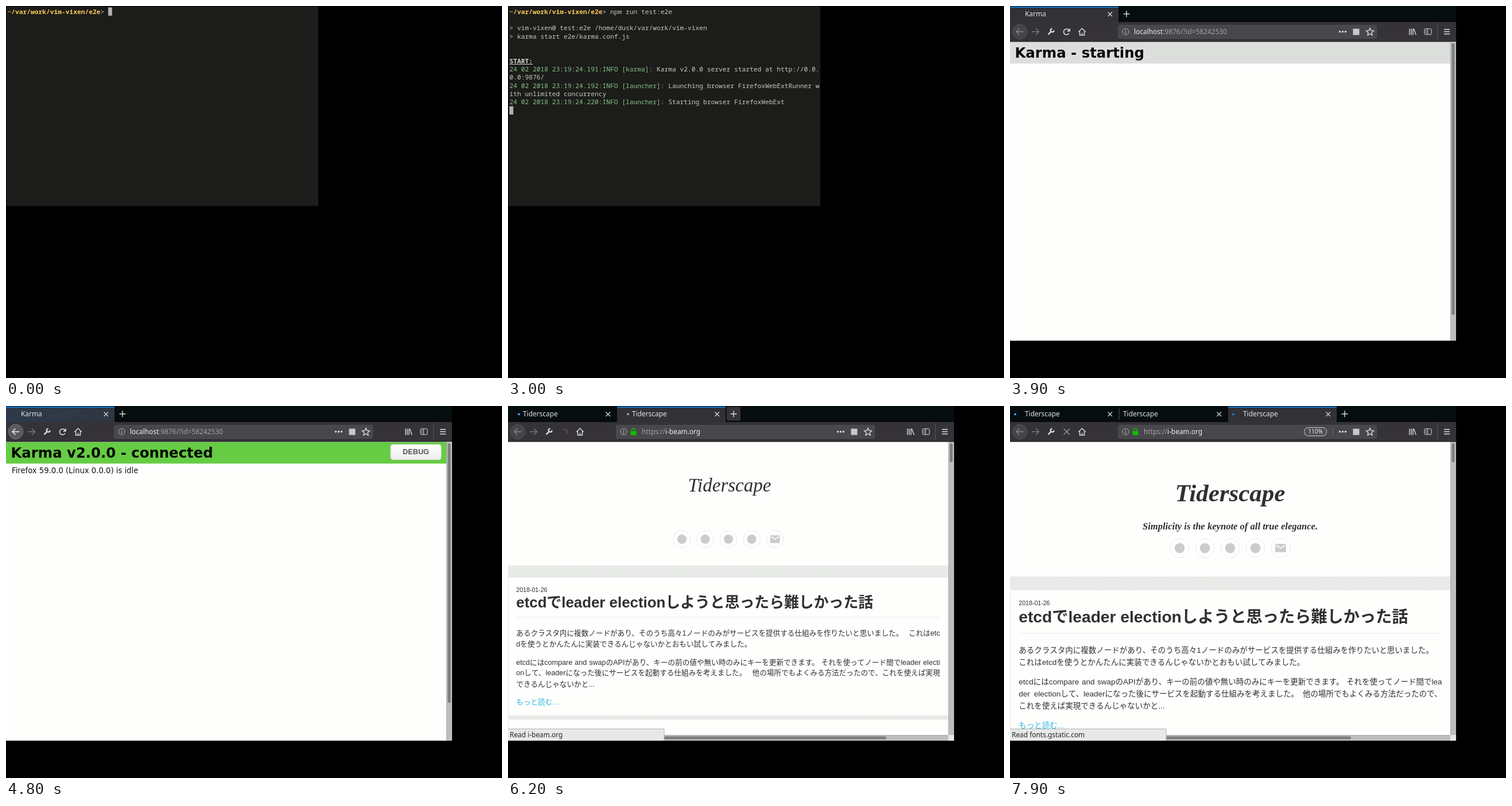
Animation of 864x648 px, one loop 8 s. Source, as an HTML page with a canvas:

```html
<!DOCTYPE html>
<html lang="en">
<head>
<meta charset="utf-8">
<title>End-to-end test run</title>
<style>
html, body { margin: 0; width: 100%; height: 100%; overflow: hidden; background: #000; }
canvas { display: block; }
</style>
</head>
<body>
<canvas id="stage" width="864" height="648"></canvas>
<script>
const g = document.getElementById('stage').getContext('2d');
const UI = '"Noto Sans", sans-serif';
const MONO = '11.25px "Noto Sans Mono", monospace';
const WEB = '"Liberation Sans", "Noto Sans CJK JP", sans-serif';
const SERIF = '"Liberation Serif", serif';
const SITE = 'Tiderscape';
const LIGHT = '#dcdcdd', DIM = '#77767a', PAPER = '#fefefd';

function rect(x, y, w, h, color) {
  g.fillStyle = color;
  g.fillRect(x, y, w, h);
}
function round(x, y, w, h, r, fill, stroke) {
  g.beginPath();
  g.roundRect(x, y, w, h, r);
  if (fill) { g.fillStyle = fill; g.fill(); }
  if (stroke) { g.strokeStyle = stroke; g.lineWidth = 1; g.stroke(); }
}
function circle(x, y, r, fill, stroke, width = 1) {
  g.beginPath();
  g.arc(x, y, r, 0, 7);
  if (fill) { g.fillStyle = fill; g.fill(); }
  if (stroke) { g.strokeStyle = stroke; g.lineWidth = width; g.stroke(); }
}
function line(d, color, width = 1.5) {
  g.strokeStyle = color;
  g.lineWidth = width;
  g.stroke(new Path2D(d));
}
// Draws text and returns the x where it ends.
function text(s, x, y, font, color, align = 'left') {
  g.font = font;
  g.fillStyle = color;
  g.textAlign = align;
  g.fillText(s, x, y);
  return x + g.measureText(s).width;
}

// ---- terminal ----
const CELL = 6.75, ROW = 14.35;
const COMMAND = 'npm run test:e2e';
const OUTPUT = [ // [row, time, text, green length]
  [2, 2700, '> vim-vixen@ test:e2e /home/dusk/var/work/vim-vixen', 0],
  [3, 2700, '> karma start e2e/karma.conf.js', 0],
  [7, 2900, '24 02 2018 23:19:24.191:INFO [karma]: Karma v2.0.0 server started at http://0.0.', 37],
  [8, 2900, '0.0:9876/', 0],
  [9, 2900, '24 02 2018 23:19:24.192:INFO [launcher]: Launching browser FirefoxWebExtRunner w', 40],
  [10, 2900, 'ith unlimited concurrency', 0],
  [11, 3000, '24 02 2018 23:19:24.220:INFO [launcher]: Starting browser FirefoxWebExt', 40]
];

function put(s, col, row, color, bold) {
  text(s, 2.5 + col * CELL, 13.6 + row * ROW, (bold ? 'bold ' : '') + MONO, color);
}
function terminal(t) {
  const fg = '#c8c8c2';
  const typed = Math.max(0, Math.min(COMMAND.length, Math.floor((t - 900) / 100)));
  rect(1, 1, 543, 347.5, '#1c1c1a');
  put('~/var/work/vim-vixen/e2e', 0, 0, '#fccb58', true);
  put('>', 24, 0, '#c5c8d8');
  put(COMMAND.slice(0, typed), 26, 0, fg);
  for (const [row, time, s, green] of OUTPUT) {
    if (t < time) continue;
    put(s.slice(0, green), 0, row, '#87c48a');
    put(s.slice(green), green, row, fg);
  }
  if (t >= 2800) {
    put('START:', 0, 6, '#d4d4d0', true);
    rect(2.5, 101, 6 * CELL, 1, '#d4d4d0');
  }
  const row = t < 2600 ? 0 : t < 2700 ? 1 : t < 2800 ? 5 : t < 2900 ? 7 : t < 3000 ? 11 : 12;
  rect(2.5 + (row ? 0 : 26 + typed) * CELL, 2.5 + row * ROW, CELL, ROW, '#b2b2b0');
}

// ---- browser frame ----
function tab(i, { title, load, glow = 0 }, active, t) {
  const x = i * 190;
  if (active) {
    rect(x, 1, 189, 27, '#323135');
    rect(x, 1, 189, 1.7, '#1683e0');
  } else if (i) rect(x - 0.5, 4, 1, 20, '#55585a');
  if (glow) {
    const fade = g.createLinearGradient(x, 0, x + 170, 0);
    fade.addColorStop(0, `rgba(10,132,255,${glow})`);
    fade.addColorStop(1, `rgba(10,132,255,${glow * 0.6})`);
    rect(x, 3, active ? 189 : 158, 25, fade);
  }
  if (load) {
    const swing = 1.4 * Math.cos((t - 6200) / 1050 * 2 * Math.PI);
    circle(x + 14 + 5 * Math.max(-1, Math.min(1, swing)), 14.3, 1.9, load);
  }
  text(title, x + (i === 0 || load ? 26 : 7), 18.4, '11.9px ' + UI, '#e4e4e6');
  line(`M${x + 170.5} 10.5l7.5 7.5m0-7.5l-7.5 7.5`, '#d0d0d2', 1.4);
}

function reloadIcon(mode) {
  if (mode === 'x') return line('M93.5 39.5l10.5 10.5m0-10.5l-10.5 10.5', '#98979b', 1.4);
  if (mode === 'slash') return line('M93.5 40l9 9', '#67666a', 1.3);
  const arc = mode === 'arc';
  g.beginPath();
  g.arc(98.5, 45, 5, arc ? -2.3 : 0.5, arc ? 0.9 : 5.6);
  g.strokeStyle = arc ? '#646367' : LIGHT;
  g.lineWidth = arc ? 1.2 : 1.7;
  g.stroke();
  if (!arc) {
    g.fillStyle = LIGHT;
    g.fill(new Path2D('M104.8 38.8v5.7h-5.7z'));
  }
}

function starIcon(x, y) {
  g.beginPath();
  for (let i = 0; i < 10; i++) {
    const a = i * Math.PI / 5 - Math.PI / 2, r = i % 2 ? 3.2 : 6.8;
    g.lineTo(x + r * Math.cos(a), y + r * Math.sin(a));
  }
  g.closePath();
  g.strokeStyle = LIGHT;
  g.lineWidth = 1.4;
  g.stroke();
}

function zoomPill(pulse) {
  g.save();
  g.beginPath();
  g.rect(188, 33, 450.5, 24);
  g.clip();
  if (pulse) {
    round(585.5, 34.5, 58, 20.5, 10, '#4e4d51', '#d4d4d6');
    text('110%', 596.5, 49.7, '13.6px ' + UI, '#ececee');
  } else {
    round(512.5, 37.5, 39, 14.5, 7, '#4e4d51', '#d4d4d6');
    text('110%', 532, 48.3, '10px ' + UI, '#ececee', 'center');
  }
  g.restore();
}

function frame(t, o) {
  rect(0, 0, 777, 28, '#060d0f');
  rect(0, 28, 777, 34, '#353338');
  rect(0, 61.5, 777, 1, '#151416');
  o.tabs.forEach((item, i) => tab(i, item, i === o.tabs.length - 1, t));
  const plus = o.tabs.length * 190 + 13;
  if (o.hover) round(plus - 12, 1.5, 24, 24, 2, '#343436');
  line(`M${plus - 5.5} 13.7h11m-5.5-5.5v11`, '#d8d8da', 1.5);

  circle(17, 44.7, 12.8, o.back ? '#59585d' : '#454449', o.back ? '#77767b' : '#504f54');
  line('M23.5 44.7h-12.5m5.5-5.5l-5.5 5.5l5.5 5.5', o.back ? '#efeff0' : '#858488');
  line('M38 44.7h12.5m-5.5-5.5l5.5 5.5l-5.5 5.5', DIM);
  line('M66.5 49.7l5.5-5.5', LIGHT, 2.4);
  g.beginPath();
  g.arc(73.6, 42.4, 2.9, 0, 4.7);
  g.lineWidth = 2.2;
  g.stroke();
  reloadIcon(o.reload);
  line('M119.3 45.2l6.2-6.2l6.2 6.2m-10.2-1v6.5h8v-6.5m-4 6.5v-4', LIGHT);

  round(188.5, 33.5, 450, 23, 2, '#48474b', '#4f4e52');
  if (o.search) {
    circle(200, 43.3, 4.2, null, '#a5a4a8', 1.5);
    line('M203 46.5l5 4.5', '#a5a4a8', 1.8);
  } else {
    circle(201.5, 44.7, 5.4, null, '#b6b5b9', 1);
    line('M201.5 43.7v4m0-6v1.2', '#b6b5b9', 1.3);
    rect(562, 37, o.pill ? 1 : 0, 16, '#66656a');
    for (const x of [574.5, 579.5, 584.5]) circle(x, 44.7, 1.7, LIGHT);
    rect(597.5, 39.5, 11, 11, '#c9c9cb');
    starIcon(627, 45.3);
  }
  if (o.lock) {
    round(213.5, 43.7, 10, 7, 1, '#12bc00');
    line('M215.7 44v-2a2.8 2.8 0 0 1 5.6 0v2', '#12bc00', 1.6);
  }
  if (o.pill) zoomPill(o.pill === 'pulse');
  let x = o.lock ? 233 : 216;
  o.url.forEach((s, i) => { x = text(s, x, 48.8, '11.9px ' + UI, i === 1 ? '#f0f0f1' : '#a3a2a6'); });

  line('M696 39.5v11m3-11v11m3-11v11m1.3-11l4 11', LIGHT, 1.4);
  round(722, 39.7, 12, 10, 1.5, null, LIGHT);
  line('M727.5 40v10m-3.7-7.5h2m-2 2.3h2m-2 2.3h2', LIGHT, 1);
  rect(744, 31, 1, 28, '#545357');
  line('M756 40.7h10m-10 4h10m-10 4h10', LIGHT, 1.5);
}

function scrollbar(end) {
  rect(767, 62.5, 10, 520.5, '#bdbfbe');
  rect(767, 62.5, 1, 520.5, '#a9abaa');
  round(769.5, 65, 5, end - 65, 2.5, '#7b7f7f');
}

// ---- test runner page ----
function runner(t) {
  const started = t >= 3900, connected = t >= 4300;
  const url = t < 3600 ? ['', ''] : ['', 'localhost', ':9876/?id=58242530'];
  frame(t, {
    tabs: [{
      title: started ? 'Karma' : t < 3400 ? '' : 'New Tab',
      glow: t >= 4500 ? 0.11 : 0
    }],
    url, back: t >= 4300, reload: 'reload'
  });
  rect(0, 62.5, 777, 520.5, PAPER);
  if (!started) return;
  rect(0, 63, 767, 37.3, connected ? '#66cc44' : '#dcdedc');
  text(connected ? 'Karma v2.0.0 - connected' : 'Karma - starting', 8.5, 90.3,
    'bold 24.35px "DejaVu Sans", sans-serif', '#050505');
  if (connected) {
    const shade = g.createLinearGradient(0, 67, 0, 94);
    shade.addColorStop(0, '#fff');
    shade.addColorStop(1, '#ececec');
    round(670, 67, 88, 26.5, 4, shade, '#d5d9d3');
    text('DEBUG', 714, 84.4, 'bold 12.7px ' + WEB, '#555', 'center');
    text('Firefox 59.0.0 (Linux 0.0.0) is idle', 10, 117, '13.2px "DejaVu Sans", sans-serif', '#111');
  }
  scrollbar(connected ? 517 : 538);
}

// ---- blog page ----
const FIRST = 'あるクラスタ内に複数ノードがあり、そのうち高々1ノードのみがサービスを提供する仕組みを作りたいと思いました。';
const USING = 'を使うとかんたんに実装できるんじゃないかとおもい試してみました。';
const SWAP = 'etcdにはcompare and swapのAPIがあり、キーの前の値や無い時のみにキーを更新できます。 それを使ってノード間で';
const THEN = 'して、leaderになった後にサービスを起動する仕組みを考えました。 他の場所でもよくみる方法だったので、';

// Rows are [text, baseline, justified].
const NORMAL = {
  left: 14.3, size: 12.6, head: 25.85, icons: [303, 40.5, 232, 15],
  band: [277.5, 299], date: 323.6, title: 351, rule: 368, name: [386, 149, 33, 39],
  tag: 196, thumb: 659, more: 520,
  rows: [
    [FIRST + ' これはetc', 400.3, true], ['d' + USING, 418.7],
    [SWAP + 'leader electi', 450.8, true],
    ['on' + THEN + 'これを使えば実現', 469.4, true], ['できるんじゃないかと...', 488.5]
  ]
};
const ZOOMED = {
  left: 15.3, size: 13.5, head: 28.2, icons: [295.5, 44, 247.5, 16.5],
  band: [297, 321], date: 347, title: 377, rule: 396, name: [383.5, 166, 36.5, 43],
  tag: 215, thumb: 594, more: 561,
  rows: [
    [FIRST, 430.3], ['これはetcd' + USING, 450.8],
    [SWAP + 'lea', 485.3, true], ['der election' + THEN, 506.2, true],
    ['これを使えば実現できるんじゃないかと...', 526.8]
  ]
};

function hatch(top, bottom) {
  g.save();
  g.beginPath();
  g.rect(0, top, 767, bottom - top);
  g.clip();
  rect(0, top, 767, bottom - top, '#ebedeb');
  let d = '';
  for (let x = -30; x < 800; x += 7) d += `M${x} ${top}l30 30m0-30l-30 30`;
  line(d, '#dfe1df', 0.8);
  g.restore();
}

function paragraph([s, y, justified], p) {
  g.font = p.size + 'px ' + WEB;
  const spaces = s.split(' ').length - 1;
  if (justified) g.wordSpacing = Math.max(-2, (752.5 - p.left - g.measureText(s).width) / spaces) + 'px';
  text(s, p.left, y, g.font, '#303030');
  g.wordSpacing = '0px';
}

function blog(p, script) {
  const [cx, cy, plain, fancy] = p.name;
  rect(0, 62.5, 767, 520.5, PAPER);
  text(SITE, cx, cy, (script ? `italic bold ${fancy}px ` : `italic ${plain}px `) + SERIF, '#303030', 'center');
  if (script) {
    text('Simplicity is the keynote of all true elegance.', cx, p.tag,
      `italic bold ${p.size * 1.23}px ` + SERIF, '#303030', 'center');
  }
  const [x0, step, y, r] = p.icons;
  for (let i = 0; i < 5; i++) {
    const x = x0 + i * step, k = r / 15;
    circle(x, y, r, null, '#ebebeb');
    if (i < 4) circle(x, y, 8 * k, '#cbcbcb');
    else {
      round(x - 8.5 * k, y - 6.7 * k, 17 * k, 13.4 * k, 1.5, '#cbcbcb');
      line(`M${x - 7 * k} ${y - 4.5 * k}l${7 * k} ${4.5 * k}l${7 * k} ${-4.5 * k}`, '#fff', 1.5);
    }
  }
  hatch(...p.band);
  rect(0, p.band[1], 1, 583 - p.band[1], '#e4e6e4');
  text('2018-01-26', p.left, p.date, '10.6px ' + WEB, '#303030');
  text('etcdでleader electionしようと思ったら難しかった話', p.left, p.title, `bold ${p.head}px ` + WEB, '#303030');
  rect(p.left, p.rule - 0.5, 752.5 - p.left, 1, '#e9e9e9');
  p.rows.forEach(row => paragraph(row, p));
  text('もっと読む…', p.left, p.more, p.size + 'px ' + WEB, '#2fb9e0');
  if (p === NORMAL) hatch(538.5, 546.5);

  scrollbar(98);
  rect(0, 573, 767, 10, '#bdbfbe');
  rect(0, 573, 767, 1, '#a9abaa');
  round(2, 575.5, p.thumb - 2, 5, 2.5, '#7b7f7f');
  rect(767, 573, 10, 10, '#e6e8e7');
  rect(0, 562, 272.5, 21, '#b0b2b1');
  rect(0, 563, 271.5, 20, '#e7e9e8');
  text(script ? 'Read fonts.gstatic.com' : 'Read i-beam.org', 3, 577.2, '11.9px ' + UI, '#252525');
}

function blogWindow(t) {
  const blue = '#5aa9f5', grey = '#a9a9ad', third = t >= 7000;
  const tabs = [{
    title: t < 5500 ? 'New Tab' : t < 5800 ? 'i-beam.org' : SITE,
    load: t >= 5500 && (t < 5800 ? grey : blue)
  }];
  if (t >= 6100) {
    tabs.push({
      title: t < 6200 ? 'i-beam.org' : SITE,
      load: t >= 6200 && t < 6800 && (t < 6400 ? grey : blue),
      glow: t >= 6800 && t < 7300 ? 0.1 : 0
    });
  }
  if (third) {
    tabs.push({
      title: t < 7300 ? 'i-beam.org' : SITE,
      load: t >= 7200 && (t < 7400 ? grey : '#1683e0')
    });
  }
  const search = t < 5700 || (t >= 6100 && t < 6200) || (third && t < 7200);
  const pulse = (t >= 6500 && t < 6700) || (third && t < 7200);
  frame(t, {
    tabs, search, lock: !search,
    hover: tabs.length === 2,
    url: t < 5400 ? ['', ''] : ['https://', 'i-beam.org'],
    reload: t < 5500 ? 'reload' : t >= 6100 && t < 6300 ? 'arc' : third && t < 7200 ? 'slash' : 'x',
    pill: t >= 6500 && (pulse ? 'pulse' : 'small')
  });
  const shown = (t >= 5800 && t < 6100) || (t >= 6200 && t < 7000) || t >= 7400;
  if (shown) blog(t < 6500 ? NORMAL : ZOOMED, (t >= 6700 && t < 7000) || t >= 7700);
  else rect(0, 62.5, 777, 520.5, '#f5fafe');
}

function draw(now) {
  const t = Math.floor(now % 8000 / 100) * 100;
  rect(0, 0, 864, 648, '#000');
  if (t < 3100) terminal(t);
  else if (t < 5200) runner(t);
  else blogWindow(t);
}

const start = performance.now();
function tick() {
  draw(performance.now() - start);
  requestAnimationFrame(tick);
}
tick();
</script>
</body>
</html>
```
